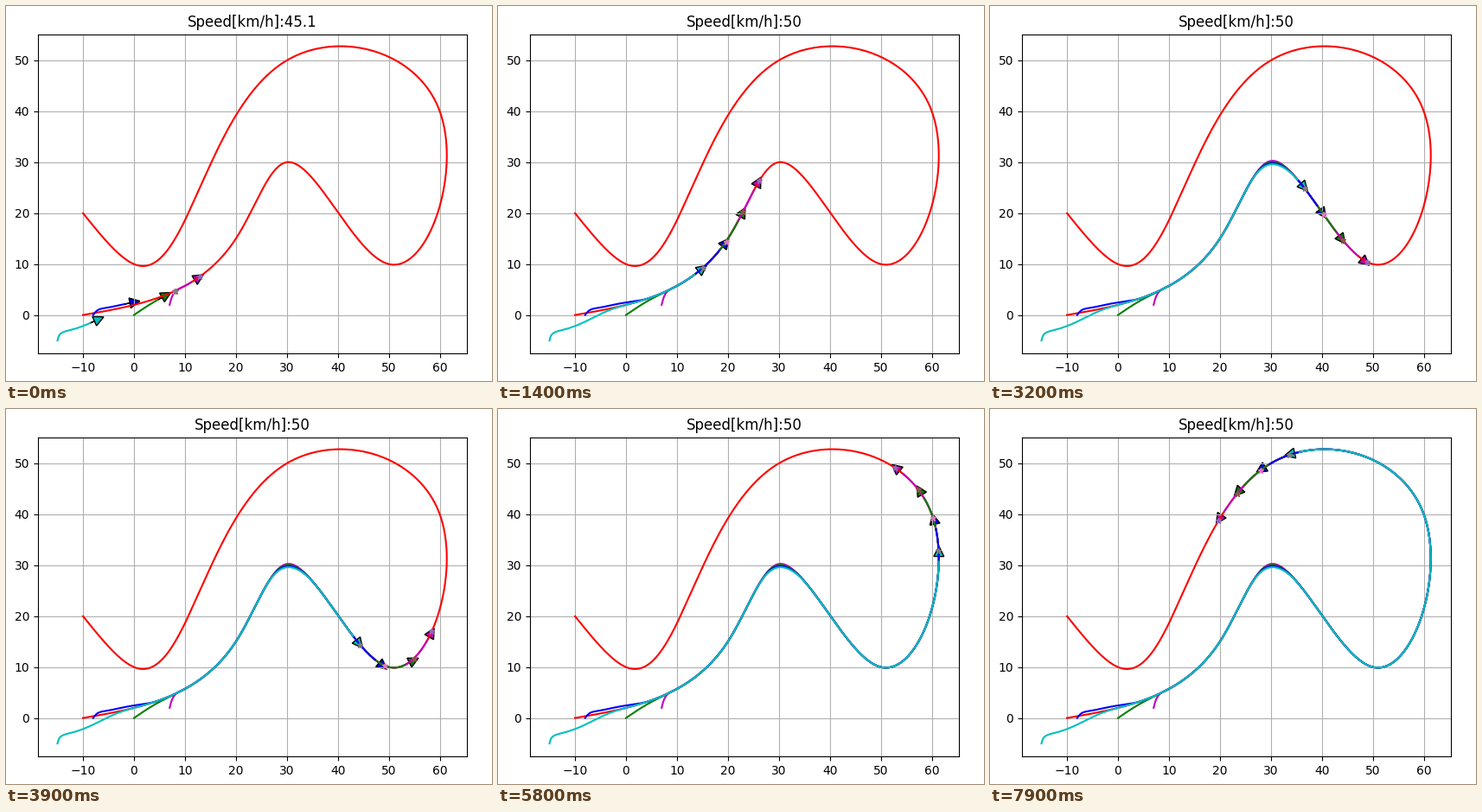
A matplotlib script that plays this animation: 562x434 px, repeating every 8 s.

```python
import numpy as np
import matplotlib.pyplot as plt
from matplotlib.animation import FuncAnimation
from matplotlib.patches import FancyArrow

FRAMES, INTERVAL = 80, 100
STEP = 0.05  # spacing of path samples, in metres


def resample(pts):
    """Points evenly spaced along a polyline."""
    s = np.r_[0, np.cumsum(np.hypot(*np.diff(pts, axis=0).T))]
    even = np.arange(0, s[-1], STEP)
    return np.column_stack([np.interp(even, s, c) for c in pts.T])


def spline(knots):
    """Natural cubic spline over chord length."""
    p = np.asarray(knots, float)
    n = len(p)
    h = np.hypot(*np.diff(p, axis=0).T)
    slope = np.diff(p, axis=0) / h[:, None]
    a, rhs = np.eye(n), np.zeros((n, 2))
    for i in range(1, n - 1):
        a[i, i - 1:i + 2] = h[i - 1], 2 * (h[i - 1] + h[i]), h[i]
        rhs[i] = 6 * (slope[i] - slope[i - 1])
    m = np.linalg.solve(a, rhs)
    v = np.linspace(0, 1, 200)[:, None]
    u = 1 - v
    parts = [u * p[i] + v * p[i + 1]
             - h[i] ** 2 / 6 * ((u - u ** 3) * m[i] + (v - v ** 3) * m[i + 1])
             for i in range(n - 1)]
    return resample(np.vstack(parts))


def nearest(path, point):
    return int(np.argmin(np.hypot(*(path - point).T)))


def steps(metres):
    return int(round(metres / STEP))


course = spline([(-10, 0), (20, 15), (30, 30), (50, 10),
                 (60, 40), (30, 50), (0, 10), (-10, 20)])
crest = nearest(course, (30.4, 30))
bend = np.exp(-((np.arange(len(course)) - crest) * STEP / 3.5) ** 2)

AIM = 2.2        # arrow centre and goal lie this far ahead of a car
MERGE = (8.1, 4.65)
# Leading arrow and spacing of the cars: time, place, gap
POSES = [(14, (26.2, 26.1), 6.8), (32, (48.7, 10.6), 6.35),
         (79, (19.85, 39.0), 6.4)]


class Car:
    """One vehicle: its run-up, then the course with its own cornering error."""

    def __init__(self, rank, color, travelled, run_up):
        self.color, self.mark = color, f"C{4 + rank}"
        join = nearest(course, run_up[-1])
        out = join + steps(1.5)
        track = course.copy()
        track[:, 1] += (0.25 - 0.22 * rank) * bend
        entry = spline(run_up[:-1] + [course[join], course[out]])
        self.path = resample(np.vstack([entry, track[out + 1:]]))
        self.merge = nearest(self.path, MERGE)
        self.times, self.keys = [0], [steps(travelled)]
        for time, place, gap in POSES:
            at = nearest(course, place) - steps(2 + rank * gap)
            self.times.append(time)
            self.keys.append(nearest(self.path, course[at]))

    def move(self, n):
        i = int(round(np.interp(n, self.times, self.keys)))
        d = self.path[i + 4] - self.path[i - 4]
        dx, dy = d / np.hypot(*d)
        x, y = self.path[i]
        self.trail.set_data(*self.path[:i + 1].T)
        self.arrow.set_data(x=x, y=y, dx=dx, dy=dy)
        goal = max(i + steps(AIM), self.merge)
        self.goal.set_data(*self.path[[goal]].T)


cars = [
    Car(0, "m", 6.3, [(7, 2), (8.1, 4.6), (10.2, 5.9)]),
    Car(1, "g", 5.5, [(0, 0), (4, 2.6), (8.5, 4.9)]),
    Car(2, "b", 6.8, [(-8, 0), (-7.2, 0.9), (-5.5, 1.4), (-1, 2.3),
                      (4.5, 3.2)]),
    Car(3, "c", 7.6, [(-15, -5), (-14.6, -3.9), (-12.5, -2.95), (-8, -1.3),
                      (-3, 1.05), (0.5, 2.05)]),
]

W, H = 562, 434
fig = plt.figure(figsize=(W / 100, H / 100), dpi=100)
ax = fig.add_axes([37 / W, 31.8 / H, 496 / W, 369.6 / H])
ax.set_xlim(-18.825, 65.325)
ax.set_ylim(-7.56, 55.14)
ax.grid(True)
title = ax.set_title("")

ax.plot(*course.T, "-r")
for car in cars:
    car.trail, = ax.plot([], [], "-" + car.color)
    car.arrow = ax.add_patch(FancyArrow(0, 0, 1, 0, width=0.001, head_width=2,
                                        head_length=2, fc=car.color, ec="k"))
for car in cars:
    car.goal, = ax.plot([], [], "*", color=car.mark, ms=5)


def update(n):
    title.set_text(f"Speed[km/h]:{50 - 4.9 * 0.68 ** n:.3g}")
    for car in cars:
        car.move(n)
    return []


anim = FuncAnimation(fig, update, frames=FRAMES, interval=INTERVAL,
                     repeat=True, repeat_delay=0)
plt.show()
```
